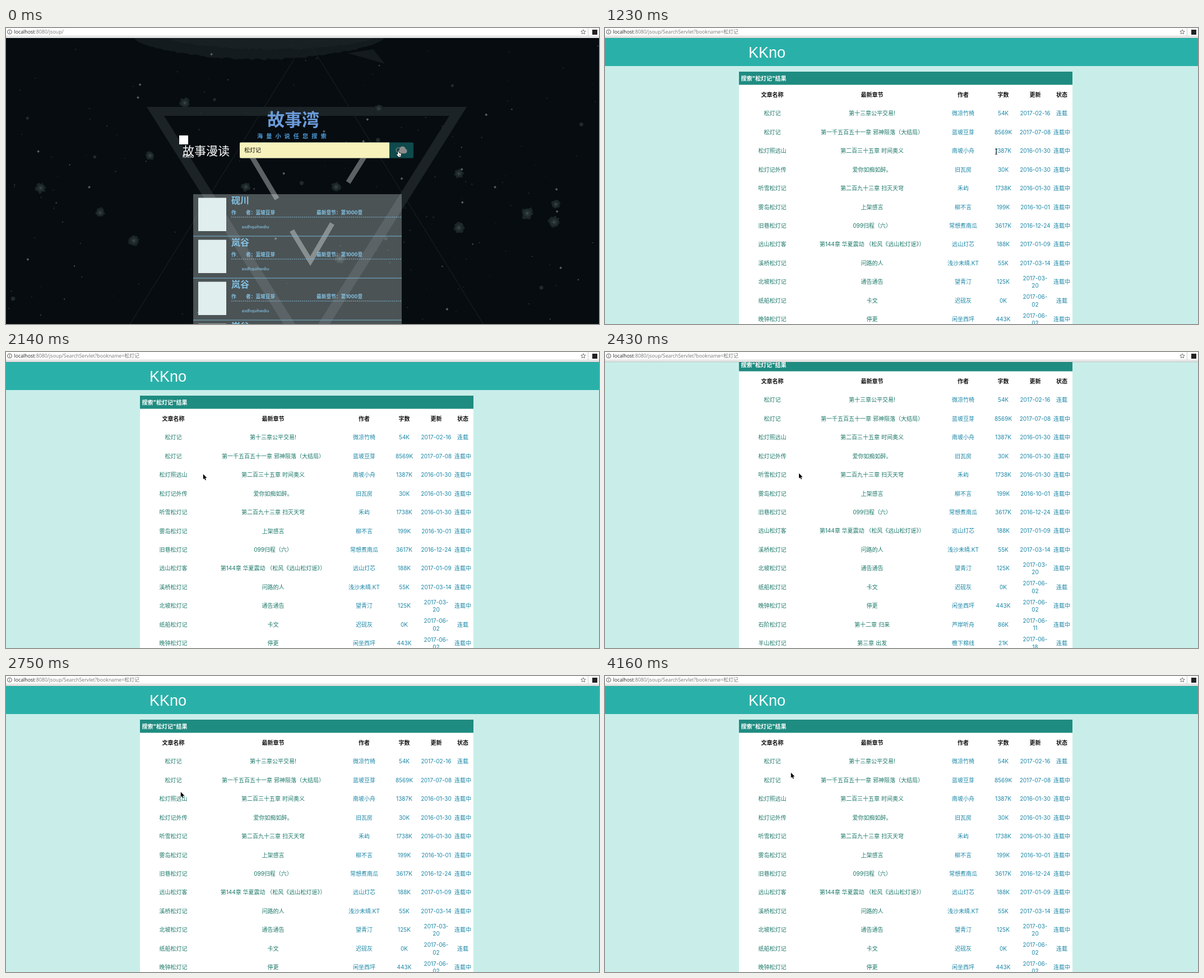
These frames come from a looping animation (1058x529 px, 8 s). An HTML page with a canvas:

```html
<!DOCTYPE html>
<html lang="zh">
<head>
<meta charset="utf-8">
<title>小说搜索</title>
<style>
html, body { margin: 0; width: 100%; height: 100%; overflow: hidden; background: #fff; }
canvas { display: block; width: 100vw; height: 100vh; }
</style>
</head>
<body>
<canvas id="stage" width="1058" height="529"></canvas>
<script>
const ctx = document.getElementById('stage').getContext('2d');
const W = 1058, H = 529, LOOP = 8000, BAR = 18, TICK = 150;
const SANS = 'Inter, "Noto Sans CJK SC", "Noto Sans CJK", sans-serif';
const URL_FONT = '"Open Sans", "Noto Sans CJK SC", "Noto Sans CJK", sans-serif';
const QUERY = '松灯记', SITE = 'KKno', AUTHOR = '蓝坡豆芽';

// Pointer poses; a pose with an ease glides towards the next one in ticks.
const POSES = [
  { at: 0, shape: 'hand', x: 700, y: 220 },
  { at: 1230, shape: 'beam', x: 698, y: 221 },
  { at: 1380, shape: 'arrow', x: 689.5, y: 220.5 },
  { at: 1550, shape: 'beam', x: 508, y: 246 },
  { at: 1850, shape: 'beam', x: 475, y: 246.5 },
  { at: 2000, shape: 'arrow', x: 363.5, y: 219 },
  { at: 2140, shape: 'arrow', x: 351.5, y: 218, ease: f => f ** 1.7 },
  { at: 2610, shape: 'arrow', x: 311.5, y: 207, ease: f => 1 - (1 - f) ** 2 },
  { at: 2930, shape: 'arrow', x: 303.5, y: 198 },
  { at: 3110, shape: 'arrow', x: 299.5, y: 163 },
  { at: 3260, shape: 'hand', x: 298.5, y: 152 },
  { at: 4010, shape: 'arrow', x: 323.5, y: 168 },
  { at: 4160, shape: 'arrow', x: 331.5, y: 172.5 }
];

const COLUMNS = [298.5, 476.5, 639, 710.5, 767.5, 815];
const HEADS = ['文章名称', '最新章节', '作者', '字数', '更新', '状态'];
const ROWS = [
  '松灯记|第十三章公平交易!|微凉竹椅|54K|2017-02-16|连载',
  '松灯记|第一千五百五十一章 邪神陨落（大结局）|蓝坡豆芽|8569K|2017-07-08|连载中',
  '松灯照远山|第二百三十五章 时间奥义|南坡小舟|1387K|2016-01-30|连载中',
  '松灯记外传|爱你如痴如醉。|旧瓦房|30K|2016-01-30|连载中',
  '听雪松灯记|第二百九十三章 扫灭天穹|禾屿|1738K|2016-01-30|连载中',
  '雾岛松灯记|上架感言|柳不言|199K|2016-10-01|连载中',
  '旧巷松灯记|099归程（六）|常想煮南瓜|3617K|2016-12-24|连载中',
  '远山松灯客|第144章 华夏震动 （松风《远山松灯谣》）|远山灯芯|188K|2017-01-09|连载中',
  '溪桥松灯记|问路的人|浅沙未晴.KT|55K|2017-03-14|连载中',
  '北坡松灯记|通告通告|望青汀|125K|2017-03-/20|连载中',
  '纸船松灯记|卡文|迟砚灰|0K|2017-06-/02|连载',
  '晚钟松灯记|停更|闲坐西坪|443K|2017-06-/02|连载中',
  '石阶松灯记|第十二章 归来|芦岸听舟|86K|2017-06-/11|连载中',
  '半山松灯记|第三章 出发|檐下棉线|21K|2017-06-/18|连载'
].map(row => row.split('|'));

const BURSTS = [
  [319, 134], [665, 144], [473, 152], [257, 228], [62, 286], [428, 284], [589, 284], [808, 260],
  [168, 330], [228, 380], [808, 357], [930, 331], [981, 315], [978, 347], [596, 412]
];

function seeded(seed) {
  return () => {
    seed = (seed * 1664525 + 1013904223) % 4294967296;
    return seed / 4294967296;
  };
}

function ring(x, y, count, radius) {
  return Array.from({ length: count }, (_, i) => {
    const a = i / count * Math.PI * 2 - Math.PI / 2, r = radius(i);
    return [x + r * Math.cos(a), y + r * Math.sin(a)];
  });
}

function rect(x, y, w, h, color) {
  ctx.fillStyle = color;
  ctx.fillRect(x, y, w, h);
}

function roundRect(x, y, w, h, radii, color) {
  ctx.beginPath();
  ctx.roundRect(x, y, w, h, radii);
  ctx.fillStyle = color;
  ctx.fill();
}

function path(points, close = true) {
  ctx.beginPath();
  points.forEach(([x, y]) => ctx.lineTo(x, y));
  if (close) ctx.closePath();
}

function poly(points, color) {
  path(points);
  ctx.fillStyle = color;
  ctx.fill();
}

function line(points, color, width, close = false) {
  path(points, close);
  ctx.strokeStyle = color;
  ctx.lineWidth = width;
  ctx.stroke();
}

function disc(x, y, r, color) {
  ctx.beginPath();
  ctx.arc(x, y, r, 0, Math.PI * 2);
  ctx.fillStyle = color;
  ctx.fill();
}

function circle(x, y, r, color, width) {
  ctx.beginPath();
  ctx.arc(x, y, r, 0, Math.PI * 2);
  ctx.strokeStyle = color;
  ctx.lineWidth = width;
  ctx.stroke();
}

// cy is the vertical middle of the glyphs
function text(str, x, cy, size, color, { weight = 400, align = 'left', font = SANS } = {}) {
  ctx.font = `${weight} ${size}px ${font}`;
  ctx.textAlign = align;
  ctx.fillStyle = color;
  ctx.fillText(str, x, cy + size * 0.37);
  return ctx.measureText(str).width;
}

function addressBar(t) {
  rect(0, 0, W, BAR, '#fff');
  rect(0, 14, W, 1, '#c9c9c9');
  rect(0, 15, W, 2, '#f3f3f3');
  rect(0, 17, W, 1, '#b8b8b8');
  rect(1038, 0, 1, 14, '#cfcfcf');
  circle(6.5, 7, 3.9, '#555', 1);
  rect(6, 4.6, 1, 1, '#555');
  rect(6, 6.4, 1, 2.8, '#555');

  const opts = { font: URL_FONT };
  const host = text('localhost', 14.5, 6.8, 8.8, '#222', opts);
  const route = ':8080/jsoup/' + (t < 1050 ? '' : 'SearchServlet?bookname=' + QUERY);
  text(route, 14.5 + host, 6.8, 8.8, '#777', opts);

  line(ring(1030, 7.2, 10, i => i % 2 ? 2 : 4.4), '#666', 0.9, true);
  rect(1046, 3, 9, 9, '#222');
}

function smudge(rnd) {
  const layer = (left, right, depth, color) => {
    const points = [];
    for (let x = left; x <= right; x += 6) {
      const arc = Math.sin(Math.PI * (x - left) / (right - left)) ** 0.6;
      points.push([x, BAR + depth * arc + (rnd() - 0.5) * 4 * arc]);
    }
    poly([[left, BAR], ...points, [right, BAR]], color);
  };
  layer(228, 674, 38, '#141b1f');
  layer(290, 655, 20, '#182024');
  poly([[610, 45], [676, 64], [655, 38]], '#141b1f');
}

function burst(x, y, rnd) {
  const r = 8 + rnd() * 4;
  poly(ring(x, y, 22, () => r * (0.72 + rnd() * 0.4)), '#1b2427');
  disc(x, y, r * 0.55, '#242f31');
  disc(x, y, r * 0.22, '#394446');
}

function stars(rnd) {
  const scatter = (count, put) => {
    for (let i = 0; i < count; i++) put(rnd() * W, 30 + rnd() * (H - 35));
  };
  scatter(10, (x, y) => disc(x, y, 2.5 + rnd() * 1.5, '#20292c'));
  scatter(150, (x, y) => disc(x, y, 0.6 + rnd() * 0.7, rnd() < 0.3 ? '#465053' : '#252e31'));
  scatter(20, (x, y) => poly(ring(x, y, 4, () => 2.4), '#566063'));
}

function space() {
  const rnd = seeded(23), mid = 536.5;
  rect(0, BAR, W, H - BAR, '#060c10');
  smudge(rnd);
  line([[mid - 315, H], [mid, 19], [mid + 315, H]], '#1c2427', 1);

  ctx.beginPath();
  for (const [half, top] of [[285.5, 141], [254.5, 157]]) {
    ctx.moveTo(mid - half, top);
    ctx.lineTo(mid + half, top);
    ctx.lineTo(mid, top + half * 1.59);
    ctx.closePath();
  }
  ctx.fillStyle = '#1c2327';
  ctx.fill('evenodd');

  BURSTS.forEach(([x, y]) => burst(x, y, rnd));
  stars(rnd);

  const beam = '#5c6163';
  line([[437.5, 228], [483.5, 305.5]], beam, 9);
  line([[640.5, 228], [610.5, 276]], beam, 9);
  line([[510, 362], [543, 416.5], [582, 349.5]], beam, 9);
}

function searchBox() {
  rect(309, 192, 16, 16, '#fff');
  text('故事漫读', 315, 219.5, 21, '#fff', { weight: 500 });
  text(SITE, 315, 229.5, 7.8, '#fff', { weight: 500 });

  text('故事湾', 512.5, 164, 31, '#6b9bd9', { weight: 700, align: 'center' });
  [...'海量小说任您搜索'].forEach((c, i) =>
    text(c, 448 + i * 16.2, 193, 10.2, '#4d98d4', { weight: 700 }));

  roundRect(417, 204.5, 310, 28, 2, '#0f4a4c');
  roundRect(417, 204.5, 267, 28, [2, 0, 0, 2], '#f7f1bc');
  text(QUERY, 425, 218, 10, '#111');

  const cloud = '#8b8b8b';
  circle(700, 218, 4, cloud, 1.2);
  disc(707.5, 217, 5.5, cloud);
  disc(711.5, 220, 4, cloud);
  disc(703.5, 221, 3.4, cloud);
  rect(703, 219, 9, 5.2, cloud);
}

function bookList() {
  const sky = '#84c2e3', bold = { weight: 700 };
  rect(334, 297, 372, H - 297, 'rgba(243,255,255,.29)');
  for (let y = 297; y < H; y += 75) {
    rect(343, y + 6.5, 50, 59.5, '#e0eeed');
    text(y > 297 ? '岚谷' : '砚川', 402, y + 11.5, 16, sky, bold);
    text('作', 402, y + 32.5, 8.7, sky, bold);
    text('者：' + AUTHOR, 428, y + 32.5, 8.7, sky, bold);
    text('最新章节：第1000章', 554, y + 32.5, 8.7, sky, bold);
    ctx.setLineDash([2, 1.5]);
    line([[402, y + 41], [706, y + 41]], sky, 1);
    ctx.setLineDash([]);
    text('asdhquihwdiu', 420.5, y + 58, 7.3, sky, { weight: 500 });
    rect(334, y + 74.5, 372, 1, '#78b6d2');
  }
}

function scrollTop(t) {
  if (t < 2290 || t >= 2750) return 0;
  return t < 2610 ? 67 : 3;
}

function results(t) {
  const hover = t >= 3260 && t < 4010;
  const mid = { align: 'center' };
  rect(0, BAR, W, H - BAR, '#c9eeea');
  ctx.save();
  ctx.translate(0, -scrollTop(t));
  rect(0, BAR, W, 50, '#29b1a9');
  text(SITE, 256, 43.2, 27, '#fff', { font: '"Liberation Sans", sans-serif' });
  rect(239, 78, 595, 700, '#fff');
  rect(239, 78, 595, 23.5, '#1f8c81');
  text(`搜索"${QUERY}"结果`, 242.5, 90, 10, '#fff', { weight: 700 });
  HEADS.forEach((head, c) => text(head, COLUMNS[c], 119, 10, '#111', { ...mid, weight: 700 }));

  ROWS.forEach((row, r) => {
    const y = 152.6 + r * 33.45;
    row.forEach((cell, c) => {
      const color = hover && !r && !c ? '#ff7443' : c < 2 ? '#1c7869' : '#1b86a6';
      const parts = cell.split('/');
      parts.forEach((part, i) =>
        text(part, COLUMNS[c], y + (i - (parts.length - 1) / 2) * 13.4, 10, color, mid));
    });
  });
  ctx.restore();
}

function outlined(points, fill, stroke, width) {
  ctx.lineJoin = 'round';
  line(points, stroke, width, true);
  ctx.lineJoin = 'miter';
  poly(points, fill);
}

const SHAPES = {
  arrow() {
    outlined([[0.3, 0.3], [0.3, 9.6], [2.4, 7.7], [4, 11.2], [5.4, 10.6], [3.9, 7.2], [6.8, 7]],
      '#000', '#fff', 1);
  },
  hand() {
    outlined([[-0.8, 0.4], [0.6, 0.4], [1, 3.6], [4, 4.3], [5.3, 5.2], [4.2, 10.3],
      [0, 10.3], [-3.2, 5.7], [-2.4, 5], [-0.8, 6.4]], '#fff', '#000', 1.4);
    for (let x = 1.2; x < 4.5; x += 1.4) line([[x, 6.6], [x, 8.8]], '#333', 0.6);
  },
  beam() {
    for (const end of [-1, 1]) line([[-2, end * 5], [0, end * 4.2], [2, end * 5]], '#222', 1);
    line([[0, -4.2], [0, 4.2]], '#222', 1.1);
    line([[-1.2, 2], [1.2, 2]], '#222', 0.8);
  }
};

function pointer(t) {
  const index = POSES.findLastIndex(pose => pose.at <= t);
  const { at, shape, x, y, ease } = POSES[index];
  const next = POSES[index + 1];
  const held = Math.floor((t - at) / TICK) * TICK;
  const f = ease ? ease(held / (next.at - at)) : 0;
  ctx.save();
  ctx.translate(x, y);
  if (f) ctx.translate((next.x - x) * f, (next.y - y) * f);
  SHAPES[shape]();
  ctx.restore();
}

function draw(now) {
  const t = now % LOOP;
  if (t < 1230) {
    space();
    searchBox();
    bookList();
  } else {
    results(t);
  }
  addressBar(t);
  pointer(t);
  requestAnimationFrame(draw);
}
requestAnimationFrame(draw);
</script>
</body>
</html>
```
